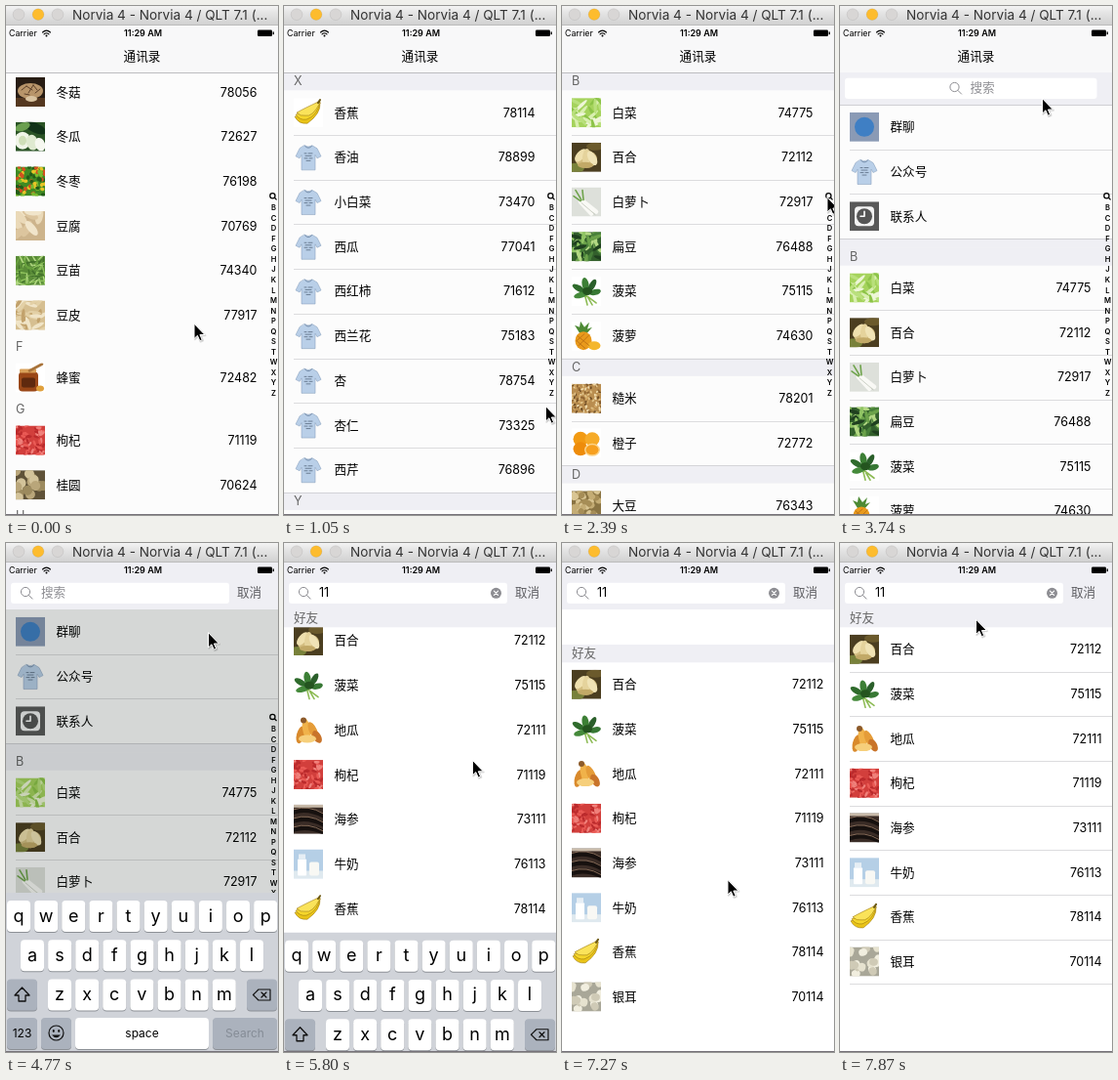
Write an HTML page that moves like this. It is 279 by 521 pixels and loops after 8 s.

```html
<!DOCTYPE html>
<html lang="zh">
<head>
<meta charset="utf-8">
<title>通讯录</title>
<style>
html, body { margin: 0; width: 100%; height: 100%; overflow: hidden; background: #fff; }
svg { display: block; }
#stage { width: 279px; height: 521px; }
text { font-family: Inter, "Noto Sans CJK SC", "Noto Sans CJK", "Noto Sans", sans-serif; font-size: 12.6px; fill: #000; }
.num { text-anchor: end; font-size: 12.5px; }
.mid { text-anchor: middle; }
.head { fill: #666; font-size: 12.6px; }
.index { font-size: 7.6px; font-weight: 600; text-anchor: middle; }
.key { font-size: 18px; text-anchor: middle; }
.small { font-size: 12px; text-anchor: middle; }
.rule { shape-rendering: crispEdges; }
</style>
</head>
<body>
<svg id="stage" viewBox="0 0 279 521" xmlns="http://www.w3.org/2000/svg"></svg>
<script>
const ROW = 45.7, HEAD = 18.3, TOP = 68, BAR = 33, STEP = 148.4, LOOP = 8000;
const GREY = '#efeff4', RULE = '#dcdcde', PAPER = '#fcfcfc';

const sections = [
  ['', '群聊 公众号 联系人'],
  ['B', '白菜 百合 白萝卜 扁豆 菠菜 菠萝'], ['C', '糙米 橙子'],
  ['D', '大豆 大蒜 地瓜 冬菇 冬瓜 冬枣 豆腐 豆苗 豆皮'],
  ['F', '蜂蜜'], ['G', '枸杞 桂圆'], ['H', '海参 海带 核桃 红枣 花生'],
  ['J', '鸡蛋 韭菜'], ['K', '苦瓜'], ['L', '辣椒 莲藕 绿豆'], ['M', '木耳'],
  ['N', '牛奶 南瓜'], ['P', '苹果 葡萄'], ['Q', '茄子 芹菜'], ['S', '山药 丝瓜'],
  ['T', '土豆'], ['W', '豌豆 莴笋'],
  ['X', '香蕉 香油 小白菜 西瓜 西红柿 西兰花 杏 杏仁 西芹'],
  ['Y', '洋葱 银耳 玉米'], ['Z', '芝麻 紫菜']
];
const hits = '百合 菠菜 地瓜 枸杞 海参 牛奶 香蕉 银耳'.split(' ');

// ---- small drawing helpers
const rect = (x, y, w, h, fill, r = 0) => `<rect x="${x}" y="${y}" width="${w}" height="${h}" rx="${r}" fill="${fill}"/>`;
const oval = (x, y, rx, ry, fill, turn = 0) => `<ellipse cx="${x}" cy="${y}" rx="${rx}" ry="${ry}" fill="${fill}" transform="rotate(${turn} ${x} ${y})"/>`;
const path = (d, fill, stroke = 'none', w = 1) => `<path d="${d}" fill="${fill}" stroke="${stroke}" stroke-width="${w}" stroke-linecap="round" stroke-linejoin="round"/>`;
const text = (x, y, s, cls = '', more = '') => `<text x="${x}" y="${y}" class="${cls}" ${more}>${s}</text>`;
const rule = (x, y, color = RULE) => `<rect class="rule" x="${x}" y="${y}" width="${279 - x}" height="1" fill="${color}"/>`;

// heap of seeded ovals on a flat ground
function heap(ground, colors, n, rx, ry, seed = 7) {
  const rnd = () => (seed = seed * 16807 % 2147483647) / 2147483647;
  let s = rect(0, 0, 30, 30, ground);
  for (let i = 0; i < n; i++)
    s += oval((rnd() * 30).toFixed(1), (rnd() * 30).toFixed(1), rx, ry, colors[i % colors.length], Math.round(rnd() * 180));
  return s;
}

const shirt = path('M11 3Q15 5.5 19 3L24 6L28 14L24 16L22 12.5V28H8V12.5L6 16L2 14L6 6Z', '#b9cfe8', '#8ba3bf', .6) +
  path('M11.5 3.5Q15 7.5 18.5 3.5', 'none', '#6f87a5', .9) +
  path('M11 11H13M15 11H19M12 13.5H18M11 16H14M16 16H19M13 18.5H17', 'none', '#596a80', .8);
const white = rect(0, 0, 30, 30, '#fff');

const pics = {
  群聊: rect(0, 0, 30, 30, '#8a9ab5') + oval(15, 15, 10, 10, '#3f7fc4'),
  联系人: rect(0, 0, 30, 30, '#595959') + rect(5, 5, 20, 20, '#f2f2f2', 4) + oval(15, 15, 8, 8, '#555') +
    path('M15 10V15H11', 'none', '#fff', 1.6),
  白菜: heap('#a5d35c', ['#d9efb0', '#8cc348', '#eef6d8', '#b9e07c'], 30, 8, 1.7, 41),
  百合: rect(0, 0, 30, 30, '#4b3e20') + oval(4, 26, 9, 5, '#78813a') + oval(24, 4, 9, 4, '#6b5a2c') +
    oval(15, 17, 11, 9, '#d3bd80') + oval(9, 13, 4, 8, '#efe0ae', 40) + oval(15, 15, 4, 9, '#e5d39c', 5) + oval(21, 16, 4, 8, '#f0e3b6', -30) + oval(14, 23, 8, 3, '#c2a967'),
  白萝卜: rect(0, 0, 30, 30, '#dde0da') + path('M11 14L25 25M9 15L20 27', 'none', '#f9f9f5', 4.5) + path('M10 13L4 3M9 14L2 9M12 13L11 3', 'none', '#6fa34c', 1.6) + path('M10 16L24 28', 'none', '#bfc4b8', .8),
  扁豆: heap('#33602c', ['#8fc463', '#477f39', '#b3d883', '#1f401f', '#6ba24a'], 30, 7, 1.9, 31),
  菠菜: white + path('M14 17L21 29M13 17L16 29M13 18L25 27', 'none', '#8dbb55', 1.6) +
    oval(7, 12, 7, 3, '#2f6b2c', 30) + oval(14, 8, 3.5, 7, '#3c7f35', -10) + oval(21, 9, 3, 7, '#2a5f2a', 30) +
    oval(24, 16, 6, 3, '#377834', -15) + oval(9, 19, 7, 3, '#458a3b', -15) + oval(16, 15, 5, 4, '#24541f'),
  菠萝: white + path('M8 12L3 4L8 6L9 0L13 6L18 1L16 8L21 6L15 13Z', '#4d8a34') + oval(12, 20, 8.5, 9.5, '#e99a1c') + oval(23, 25, 6.5, 4.5, '#f4b72e') + path('M6 15L18 25M5 20L14 28M7 25L18 14M5 20L13 13', 'none', '#b76b12', .8),
  糙米: heap('#b98d4f', ['#e2c489', '#8f6431', '#d3a966', '#f0dcae', '#6f4d25'], 120, 1.6, .9, 11),
  橙子: white + oval(9, 11, 7.5, 7.5, '#f29a12') + oval(21, 11, 7.5, 7, '#f6ab28') + oval(9, 21, 7.5, 7, '#ee8c0a') + oval(21, 22, 8, 6.5, '#fbd38a') + oval(21, 22, 6.5, 5, '#f7a01f'),
  大豆: heap('#8a7443', ['#c4ac74', '#a68d56', '#d9c593'], 44, 3.4, 3, 5),
  大蒜: heap('#cbbfb4', ['#f3eee8', '#ddd2c8'], 18, 5, 4, 9),
  地瓜: white + oval(7, 20, 4, 9, '#d98a2c', 15) + oval(13, 14, 4, 11, '#f0b24a', -10) + oval(20, 16, 4, 10, '#e59c38', -25) + oval(24, 22, 4, 7, '#c9742a', -30) + oval(14, 24, 9, 4, '#f6cf7b') + oval(10, 5, 3, 3, '#8c5a2a'),
  冬菇: rect(0, 0, 30, 30, '#281d14') + rect(0, 21, 30, 9, '#553820') + oval(15, 14, 13, 8, '#b8956a') + path('M6 13L11 9M13 16L18 8M20 16L25 12M9 17L14 18M11 9L17 13M18 8L22 13', 'none', '#5c4029', 1) + oval(16, 22, 6, 3, '#d9c3a0'),
  冬瓜: rect(0, 0, 30, 30, '#2b5426') + oval(20, 6, 12, 5, '#123319', 25) + oval(7, 19, 8, 9, '#f0f5e8') + oval(17, 21, 6, 8, '#dfead0', -15) + oval(25, 23, 5, 7, '#f6f8f0', -20) + oval(7, 5, 8, 4, '#6b9f50', -20) + oval(7, 19, 4, 5, '#cfdfb8'),
  冬枣: heap('#3f8a24', ['#e8c526', '#79bb2e', '#d3501f', '#235c18'], 70, 2.2, 1.8, 21),
  豆腐: heap('#cdb48c', ['#ead9b8', '#dcc59e', '#f1e5cb'], 9, 9, 4, 3),
  豆苗: heap('#5a8c38', ['#8cc05a', '#6aa33f', '#b4da85', '#41702a'], 50, 7, .8, 13),
  豆皮: heap('#d6bf91', ['#f0e4c7', '#e3d0a6', '#c2a26c'], 26, 7, 1.9, 17),
  蜂蜜: white + rect(3, 9, 20, 20, '#9a4717', 4) + rect(4, 6, 17, 4, '#d9a15a', 1) + rect(6, 15, 14, 10, '#5f290e', 2) + path('M14 8L27 1', 'none', '#a8733a', 2.6) + oval(25, 26, 4, 3, '#e0a03c'),
  枸杞: heap('#d23f3c', ['#ea5a55', '#bb2a2c', '#f0817b'], 70, 3, 1.3, 19),
  桂圆: heap('#5f5238', ['#b9a67a', '#9c8a5e', '#d3c39a'], 16, 5, 5, 23),
  海参: rect(0, 0, 30, 30, '#3a2c26') + path('M-2 8Q14 2 32 12M-2 17Q14 11 32 21M-2 26Q14 20 32 29', 'none', '#17110f', 5) + path('M0 5Q15 0 30 9M0 14Q15 9 30 18M0 23Q15 18 30 27', 'none', '#866b58', 1) + rect(0, 0, 30, 3, '#c7b9a8'),
  牛奶: rect(0, 0, 30, 30, '#b5cfe6') + rect(0, 22, 30, 8, '#dfe9ef') + rect(4, 10, 9, 17, '#fff', 1) + rect(16, 13, 10, 14, '#f8f8f4', 2) + rect(5, 5, 7, 5, '#e6eef4'),
  香蕉: white + [[28, 4], [24, 2], [19, 0]].map(([end, lift], i) =>
    path(`M25 4Q${18 - i * 4} ${17 - i * 3} ${1 + i} ${19 - i * 2}Q${5 + i} ${27 - i * 4} ${14 - i} ${26 - i * 4}Q${end} ${20 - lift} 27 5Z`, ['#eac417', '#f5d62c', '#fae35a'][i], '#9c7a10', .6)).join('') +
    path('M25 5L27 2', 'none', '#6d5a16', 2),
  银耳: heap('#a9a798', ['#e6e2cf', '#cfcab6', '#f1eedf'], 18, 4.4, 3.8, 47)
};

// ---- rows and layout
let id = 0, y = BAR;
const people = {}, tops = {}, middle = {};
function cell(name, top, right) {
  const c = top + ROW / 2;
  return `<g transform="translate(10 ${(c - 15).toFixed(2)})"><svg width="30" height="30">${pics[name] || shirt}</svg></g>` +
    text(51.5, c + 4.5, name) + (people[name] ? text(right, c + 4.5, people[name], 'num') : '');
}
let rows = '', lines = '', heads = '';
const headList = [];
const header = s => rect(0, 0, 279, HEAD, GREY) + rule(0, 0, '#d4d4d8') + text(10, 13.4, s, 'head');

sections.forEach(([letter, names]) => {
  if (letter === 'B') { rows += rect(0, y, 279, 9.5, GREY) + rule(0, y, '#d0d0d5'); y += 9.2; }
  if (letter) {
    tops[letter] = y;
    headList.push(letter);
    heads += `<g class="sec">${header(letter)}</g>`;
    y += HEAD;
  }
  names.split(' ').forEach((name, i, all) => {
    if (letter) {
      id++;
      people[name] = hits.includes(name) ? String(70110 + id % 9 * 1000 + id % 10)
        : String(70000 + (id * 3571 + 1204) % 9000).replace('11', '17');
    }
    rows += cell(name, y, 257.5);
    middle[name] = y + ROW / 2;
    y += ROW;
    if (i < all.length - 1) lines += rule(10, y);
  });
});
const end = y - (521 - TOP);

const resultList = names => names.map((n, i) => cell(n, HEAD - .5 + i * ROW, 268.5)).join('');
const resultLines = Array.from({ length: 8 }, (_, i) => rule(10, HEAD - .5 + (i + 1) * ROW)).join('');
const ones = Object.keys(people).filter(n => people[n].includes('1')).slice(0, 9);

const lens = (x, y, r, color, w) => `<g fill="none" stroke="${color}" stroke-width="${w}"><circle cx="${x}" cy="${y}" r="${r}"/><path d="M${x + r * .7} ${y + r * .7}l${r * .9} ${r * .9}"/></g>`;

// ---- keyboard
function keyboard() {
  const cap = (x, y, w, fill) => rect(x, y + 1, w, 32, '#8c9096', 4) + rect(x, y, w, 32, fill, 4);
  let s = rect(0, 358, 279, 163, '#d0d3d9');
  [['qwertyuiop', 13], ['asdfghjkl', 27], ['zxcvbnm', 55]].forEach(([keys, x0], r) => {
    [...keys].forEach((k, i) => {
      const x = x0 + i * 28.13;
      s += cap(x - 12, 366 + r * 40.2, 24, '#fff') + text(x, 387.5 + r * 40.2, k, 'key');
    });
  });
  const dark = '#abb2bd';
  s += cap(1, 446.4, 31, dark) + path('M16.5 455L24 463H20V469H13V463H9Z', 'none', '#111', 1.3);
  s += cap(247, 446.4, 31, dark) + path('M259 457H271V468H259L253.5 462.5ZM262 460L267 465M267 460L262 465', 'none', '#111', 1.2);
  s += cap(1, 486, 31, dark) + text(16.5, 506, '123', 'small');
  s += cap(36, 486, 31, dark) + `<circle cx="51.5" cy="501.5" r="7.5" fill="none" stroke="#111" stroke-width="1.2"/>` +
    oval(48.8, 499.5, 1, 1.4, '#111') + oval(54.2, 499.5, 1, 1.4, '#111') + path('M47 503.5Q51.5 509 56 503.5Z', '#111');
  s += cap(71, 486, 137, '#fff') + text(139.5, 506, 'space', 'small');
  return s + cap(212, 486, 66, dark) + `<g id="go">${rect(212, 486, 66, 32, '#0a7aff', 4)}</g>` +
    text(245, 506, 'Search', 'small', 'id="goText"');
}

const index = lens(273.4, 194.2, 2.6, '#000', 1.3) +
  headList.map((c, i) => text(274.5, 209.3 + i * 10.53, c, 'index')).join('');

const $ = n => document.getElementById(n);
$('stage').innerHTML = `
<defs>
  <clipPath id="below"><rect y="68" width="279" height="453"/></clipPath>
  <linearGradient id="chrome" x2="0" y2="1"><stop stop-color="#f4f4f4"/><stop offset=".3" stop-color="#e6e6e6"/><stop offset="1" stop-color="#d1d1d1"/></linearGradient>
</defs>
${rect(0, 0, 279, 521, PAPER)}
<g clip-path="url(#below)">
  <g id="list">${rows}<g id="lines">${lines}</g></g>
  <g id="heads">${heads}</g>
</g>
<g id="index">${index}</g>
<rect id="dim" y="68" width="279" height="453" fill="#08140f"/>
<g id="nav">${rect(0, 20, 279, 48, '#f8f8f9')}${rule(0, 68, '#bdbdc0')}
  ${text(139.5, 55.8, '通讯录', 'mid', 'font-weight="500"')}</g>
<g id="bar">${rect(0, 0, 279, BAR, GREY)}<g id="barLine">${rule(0, BAR, '#cfcfd4')}</g>
  <rect id="field" x="5" y="5.8" height="21.2" rx="3" fill="#fff"/>
  <g id="hint">${lens(-16, 15, 4.6, '#8e8e93', 1)}<text id="query" x="0" y="20.2"></text></g>
  <g id="clear">${oval(217.5, 16.3, 5.5, 5.5, '#8e8e93')}${path('M215.4 14.2l4.2 4.2m0-4.2l-4.2 4.2', 'none', '#fff', 1.1)}</g>
  ${text(237, 19.9, '取消', '', 'id="cancel" style="fill:#5c5c60"')}
</g>
<rect id="status" y="20" width="279" height="16"/>
${text(3, 31, 'Carrier', '', 'style="font-size:8.8px"')}
${path('M37.5 27Q41.5 23.2 45.5 27M39 28.9Q41.5 26.6 44 28.9', 'none', '#000', 1.1)}${oval(41.5, 30.6, 1, 1, '#000')}
${text(140.5, 31, '11:29 AM', 'mid', 'style="font-size:9px;font-weight:600"')}
${rect(258, 24.5, 15, 6.5, '#000', 1.2)}${rect(273.6, 26.4, 1.3, 2.8, '#000')}
<g id="results" clip-path="url(#below)">${rect(0, 68, 279, 453, '#fff')}
  <g id="found"><g id="one">${resultList(ones)}</g><g id="two">${resultList(hits)}</g><g id="foundLines">${resultLines}</g></g>
  <g id="friends">${rect(0, 0, 279, HEAD, GREY)}${text(10, 12.6, '好友', 'head')}</g>
</g>
<g id="keys">${keyboard()}</g>
${rect(0, 520, 279, 1, '#77737a')}
${rect(0, 0, 279, 19.6, 'url(#chrome)')}${rect(0, 19, 279, 1, '#bcbcbc')}
${['#d8d6d5', '#fdbc2e', '#d8d6d5'].map((c, i) => `<circle cx="${13 + i * 20}" cy="8.6" r="5.9" fill="${c}" stroke="#000" stroke-opacity=".07"/>`).join('')}
${text(68, 14, 'Norvia 4 - Norvia 4 / QLT 7.1 (...', '', 'style="font-size:13.6px;fill:#333"')}
<g id="pointer">${path('M.8 1V15.8L4.2 12.6L6.6 18L9 17L6.7 11.8H11.4Z', '#0002', '#0002', 2)}${path('M0 0V15L3.4 11.8L5.8 17.2L8.2 16.2L5.9 11H10.6Z', '#000', '#fff', 1)}</g>`;

// ---- motion
const clamp = v => Math.max(0, Math.min(1, v));
const mix = (a, b, p) => a + (b - a) * p;
// piecewise linear track of [step, value...] keys
function track(keys, k) {
  let i = 0;
  while (i < keys.length - 2 && k >= keys[i + 1][0]) i++;
  const [a, b] = [keys[i], keys[i + 1]], p = clamp((k - a[0]) / (b[0] - a[0]));
  return a.slice(1).map((v, j) => mix(v, b[j + 1], p));
}
const pointerKeys = [[0, 193, 325.5], [2, 200, 330], [7, 268.5, 410], [8, 271, 394], [9, 271, 394], [16, 272, 196],
  [17, 272, 193], [18, 281, 194], [19, 281, 194], [20, 272, 193], [25, 207.5, 95], [32, 207.5, 92], [36, 207.5, 92], [41, 184, 310],
  [44, 178.5, 299], [48, 170, 345], [50, 160, 240], [53, 139.5, 78.5]];
const pullKeys = [[38, 0], [41, -26], [44, -5], [48, 36], [50, 8], [51, -6], [53, 0]];

function scrollAt(k) {
  if (k < 8) return mix(middle.冬菇 - 20, tops.X, 1 - (1 - k / 7) ** 2);
  if (k < 10) return end;
  if (k < 17) return tops['WSPLHDB'[k - 10]];
  return 0;
}
const move = (n, x, y) => $(n).setAttribute('transform', `translate(${x.toFixed(2)} ${y.toFixed(2)})`);
const fade = (n, v) => { $(n).style.opacity = v; $(n).style.display = v > 0 ? '' : 'none'; };

function draw(t) {
  const k = Math.min(53, Math.floor(t / STEP));
  const u = clamp((k - 26) / 6), p = u * u * (3 - 2 * u);
  const scroll = scrollAt(k) + BAR * p;
  const plain = k < 3;

  move('list', 0, TOP - scroll);
  fade('lines', k < 7 ? 0 : 1);
  document.querySelectorAll('.sec').forEach((g, i) => {
    const at = TOP - scroll + tops[headList[i]];
    const next = i + 1 < headList.length ? TOP - scroll + tops[headList[i + 1]] - HEAD : 999;
    const hy = plain ? at : Math.min(Math.max(TOP, at), Math.max(next, at));
    g.setAttribute('transform', `translate(0 ${hy.toFixed(2)})`);
    g.children[0].style.fill = plain ? PAPER : GREY;
    // the gap above the first section carries its own rule
    g.children[1].style.display = plain || i === 0 ? 'none' : '';
    g.style.display = hy > 40 && hy < 530 ? '' : 'none';
  });

  // search bar takes the place of the title
  move('nav', 0, -BAR * p);
  fade('nav', 1 - p);
  fade('bar', k >= 17 ? 1 : 0);
  fade('barLine', 1 - p);
  move('bar', 0, TOP - BAR * p);
  $('field').setAttribute('width', mix(258.5, 224, p));
  move('hint', mix(133.5, 36, p), 0);
  fade('cancel', p);
  $('status').setAttribute('fill', p > 0 ? GREY : '#f8f8f9');
  fade('dim', .16 * p);
  move('index', 0, -16.3 * p);

  const typed = k < 34 ? '' : k < 36 ? '1' : '11';
  $('query').textContent = typed || '搜索';
  $('query').style.fill = typed ? '#000' : '#8e8e93';
  fade('clear', typed ? 1 : 0);
  fade('results', typed ? 1 : 0);
  fade('one', typed === '1' ? 1 : 0);
  fade('two', typed === '11' ? 1 : 0);
  fade('foundLines', k < 39 || k > 50 ? 1 : 0);
  const [pull] = track(pullKeys, k);
  move('found', 0, TOP + pull);
  move('friends', 0, TOP + Math.max(0, pull));

  const up = k < 38 ? p : 1 - clamp((k - 38) / 4);
  fade('keys', up > 0 ? 1 : 0);
  move('keys', 0, 163 * (1 - up));
  fade('go', typed ? 1 : 0);
  $('goText').style.fill = typed ? '#fff' : '#858c96';

  move('pointer', ...track(pointerKeys, k));
}

const start = performance.now();
function tick() {
  draw((performance.now() - start) % LOOP);
  requestAnimationFrame(tick);
}
tick();
</script>
</body>
</html>
```
